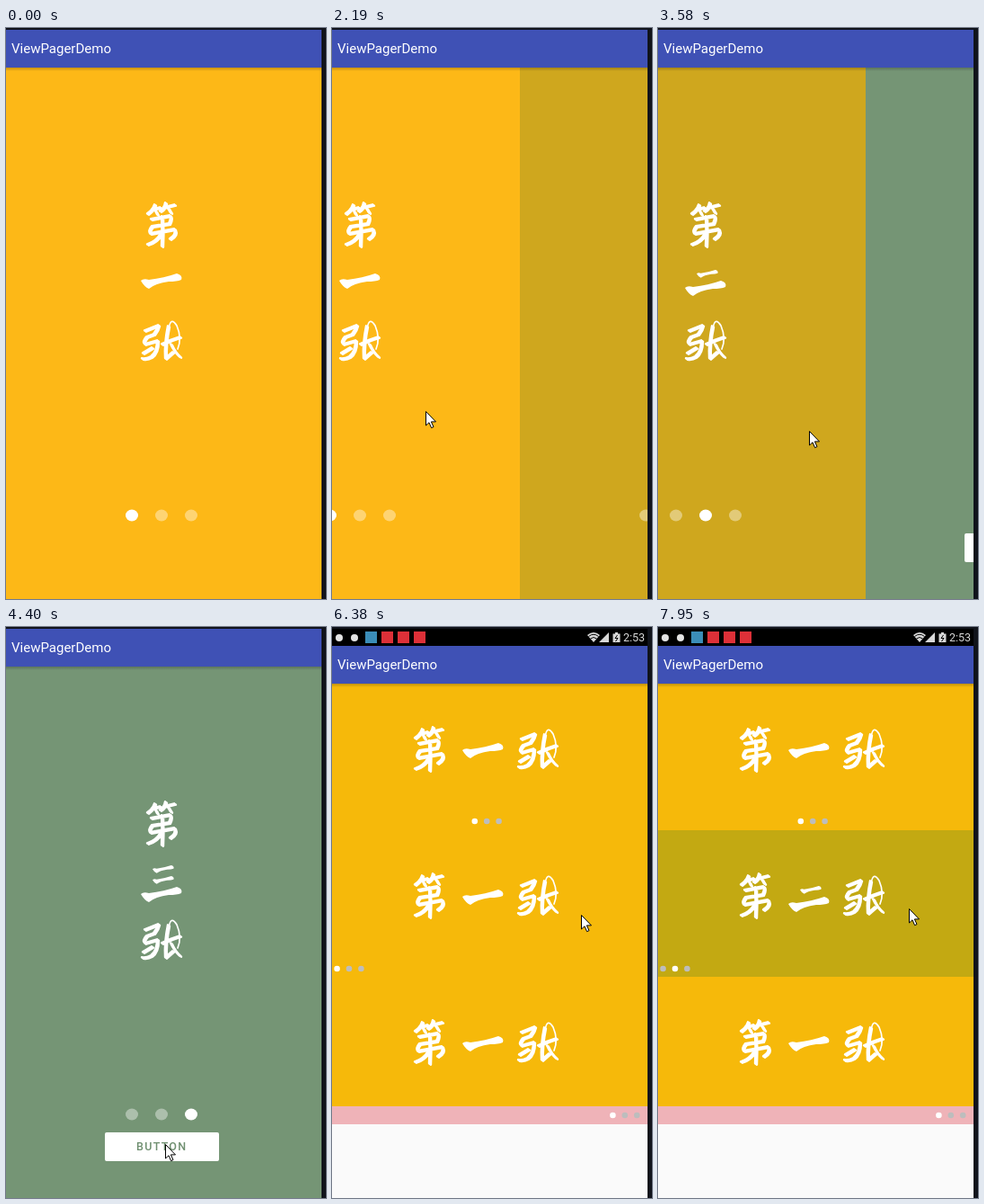
These frames come from a looping animation (356 px wide and 635 px high, 8000 ms). An HTML page with a canvas:

```html
<!DOCTYPE html>
<html lang="zh">
<head>
<meta charset="utf-8">
<title>ViewPagerDemo</title>
<style>
  html, body { margin: 0; overflow: hidden; background: #10131b; }
  canvas { display: block; }
</style>
</head>
<body>
<canvas id="stage" width="356" height="635"></canvas>
<script>
const ctx = document.getElementById('stage').getContext('2d');
const W = 351, H = 635, LOOP = 8000;
const STEP = 150, PHASE = 90;
const SLOP = 16, SETTLE = 300;  // drag threshold in px, page snap time in ms
const CLICK = 5140, ENTER = 232, OPENED = 5490;

const clamp = (v, lo, hi) => Math.min(hi, Math.max(lo, v));
const easeOut = u => 1 - (1 - clamp(u, 0, 1)) ** 2;
const mix = (a, b, u) => a + (b - a) * u;
const snap = t => Math.floor((t - PHASE) / STEP) * STEP + PHASE;

// Pointer moves; the drags also pull a pager.
const drag1 = { start: 1950, end: 2340, x: 77, y: 423 };
const drag2 = { start: 3390, end: 3840, x: 60, y: 448 };
const drag3 = { start: 6310, end: 7340, x: 40, y: 314 };
const moves = [
  { start: 840, end: 1590, x: 262, y: 444 },
  drag1,
  { start: 2340, end: 2790, x: 333, y: 445 },
  { start: 2790, end: 3240, x: 304, y: 448 },
  drag2,
  { start: 3840, end: 4290, x: 177, y: 575 },
  { start: 5490, end: 6240, x: 277, y: 320 },
  drag3,
  { start: 7340, end: 7890, x: 279, y: 313 }
];

function pointer(t) {
  let x = 296, y = 582;
  for (const m of moves) {
    const u = easeOut((t - m.start) / (m.end - m.start));
    x = mix(x, m.x, u);
    y = mix(y, m.y, u);
  }
  return { x, y };
}

// The page follows the finger, then settles on the next page.
function swipe({ start, end }, t) {
  const pulled = pointer(start).x - SLOP - pointer(clamp(t, start, end)).x;
  return mix(Math.max(0, pulled), W, easeOut((t - end) / SETTLE));
}

const DI = new Path2D(`M10 4Q8 10 2 14M7 9L16 7M11 11L13 15M22 2Q21 8 16 11M20 7L32 4M25 8L28 13
  M6 20L27 16Q29 19 26 25L7 28Q3 33 5 36L32 31Q35 37 27 42M18 17Q19 34 18 50M17 36Q12 45 2 48`);
const ZHANG = new Path2D(`M5 14L20 8Q19 13 15 18L7 21Q2 27 5 29L19 25Q19 38 12 43Q7 46 2 45M13 33L3 39
  M24 29Q34 24 44 21M31 9Q27 28 28 45L36 38M34 29Q38 38 44 43`);
const ZHANG_LOOP = new Path2D('M31 12Q33 -3 40 8Q46 22 41 34');
const BAR = new Path2D('M0 8Q3 5 9 7Q26 5 40 0Q47 2 45 7Q40 9 31 9Q16 11 9 17Q4 15 0 8Z');
const ARROW = new Path2D('M.5 .5V16L4 12.8L6.6 18.7L9 17.6L6.4 11.9H11.5Z');

function rect(x, y, w, h, color) {
  ctx.fillStyle = color;
  ctx.fillRect(x, y, w, h);
}

function fill(path, color) {
  ctx.fillStyle = color;
  ctx.fill(path);
}

function stroke(path, color, width) {
  ctx.strokeStyle = color;
  ctx.lineWidth = width;
  ctx.stroke(path);
}

function label(text, x, y, font, color) {
  ctx.font = font + ' Roboto, sans-serif';
  ctx.fillStyle = color;
  ctx.fillText(text, x, y);
}

function at(x, y, draw) {
  ctx.save();
  ctx.translate(x, y);
  draw();
  ctx.restore();
}

function dots(x, y, gap, rx, ry, active, idle) {
  for (let i = 0; i < 3; i++) {
    ctx.fillStyle = i === active ? '#fff' : idle;
    ctx.beginPath();
    ctx.ellipse(x + i * gap, y, rx, ry, 0, 0, 7);
    ctx.fill();
  }
}

// A slanted nib: the same line laid down three times along a diagonal.
function brush(path, x, y) {
  ctx.lineCap = ctx.lineJoin = 'round';
  for (let i = -1; i <= 1; i++) at(x + i, y + i * 0.7, () => stroke(path, '#fff', 2.4));
}

function zhang(x, y) {
  brush(ZHANG, x, y);
  at(x, y, () => stroke(ZHANG_LOOP, '#fff', 1.7));
}

// 一 二 三: short bars above one long bar.
function numeral(count, x, y) {
  for (let i = 0; i < count; i++) {
    const last = i === count - 1;
    at(x + (last ? 0 : 13), y + 12 * i - 4 * (count - 1), () => {
      if (!last) ctx.scale(0.52, 0.52);
      fill(BAR, '#fff');
    });
  }
}

function toolbar(y) {
  rect(0, y, W, 42, '#3f51b5');
  label('ViewPagerDemo', 6, y + 26, '15px', '#fff');
  const shadow = ctx.createLinearGradient(0, y + 42, 0, y + 46);
  shadow.addColorStop(0, 'rgba(0,0,0,.22)');
  shadow.addColorStop(1, 'rgba(0,0,0,0)');
  rect(0, y + 42, W, 4, shadow);
}

// Draws the pages of a pager that are in view.
function pager(count, scroll, drawPage) {
  for (let i = 0; i < count; i++) {
    const x = Math.round(i * W - scroll);
    if (Math.abs(x) < W) at(x, 0, () => drawPage(i, x));
  }
}

function introPage(index) {
  rect(0, 44, W, H - 44, ['#fdb817', '#cfa71e', '#759575'][index]);
  brush(DI, 156, 193);
  numeral(index + 1, 150, 273);
  zhang(150, 323);
  dots(140, 542, 33, 7, 6.5, index, 'rgba(255,255,255,.4)');
  if (index < 2) return;
  ctx.beginPath();
  ctx.roundRect(110, 562, 127, 32, 2);
  ctx.fillStyle = '#fff';
  ctx.fill();
  ctx.letterSpacing = '1.3px';
  label('BUTTON', 145, 582, '500 12.5px', '#6f8f70');
  ctx.letterSpacing = '0px';
}

function introScreen(t) {
  pager(3, swipe(drag1, t) + swipe(drag2, t), introPage);
  toolbar(2);
}

function banner(index) {
  rect(0, 0, W, 163, index ? '#c3a912' : '#f6b90a');
  brush(DI, 91, 47);
  numeral(index + 1, 145, 66);
  zhang(206, 48);
}

function listScreen(t) {
  rect(0, 0, W, H + 19, '#fafafa');
  at(0, 63, () => banner(0));
  pager(2, swipe(drag3, t), (i, x) => {
    ctx.translate(0, 307.5);
    ctx.scale(1, 1 - Math.min(0.05, Math.abs(x) / W));
    ctx.translate(0, -81.5);
    banner(i);
  });
  at(0, 389, () => banner(0));
  rect(0, 533, W, 20, '#efb3b8');
  const page = t < drag3.end ? 0 : 1;
  [[158.8, 216, 0], [5.6, 380, page], [312.4, 543, 0]].forEach(([x, y, active]) =>
    dots(x, y, 13.4, 3.3, 3.3, active, '#bdbdbd'));
  toolbar(21);
}

function statusBar() {
  rect(0, 2, W, 19, '#000');
  dots(8, 12, 17, 4, 4, -1, '#e4e4e4');
  rect(35, 2, 16, 19, '#000');
  rect(37, 5, 13, 13, '#3b8db8');
  for (let i = 0; i < 3; i++) rect(55 + i * 18, 5, 13, 13, '#dd3038');
  fill(new Path2D('M284 9Q291 3 298 9L291 17ZM297 17H308V6ZM312.5 7.5H315V6H318V7.5H320.5V17H312.5Z'), '#d8d8d8');
  stroke(new Path2D('M285.5 10.5Q291 6 296.5 10.5M287.5 13Q291 10 294.5 13M317.5 9L315 12.5H318L315.5 16'), '#000', 1);
  label('2:53', 324, 16, '12.5px', '#d8d8d8');
}

function cursor(t) {
  const { x, y } = pointer(t);
  at(Math.round(x), Math.round(y), () => {
    ctx.lineJoin = 'miter';
    fill(ARROW, '#fff');
    stroke(ARROW, '#000', 1);
  });
}

function render(t) {
  rect(0, 0, 356, H, '#10131b');
  ctx.save();
  ctx.beginPath();
  ctx.rect(0, 2, W, H);
  ctx.clip();
  // The list zooms in full screen, then moves down below the status bar.
  const shown = easeOut((t - CLICK) / ENTER);
  ctx.globalAlpha = 1 - shown;
  if (shown < 1) introScreen(t);
  ctx.globalAlpha = shown;
  if (shown > 0) at(W / 2, H / 2, () => {
    const zoom = mix(0.8, 1, shown);
    ctx.scale(zoom, zoom);
    ctx.translate(-W / 2, -H / 2 - (t < OPENED ? 19 : 0));
    listScreen(t);
  });
  ctx.globalAlpha = 1;
  if (shown > 0.5) statusBar();
  if (t >= moves[0].start) cursor(t);
  ctx.restore();
}

const start = performance.now();
function frame() {
  render(snap((performance.now() - start) % LOOP));
  requestAnimationFrame(frame);
}
frame();
</script>
</body>
</html>
```
